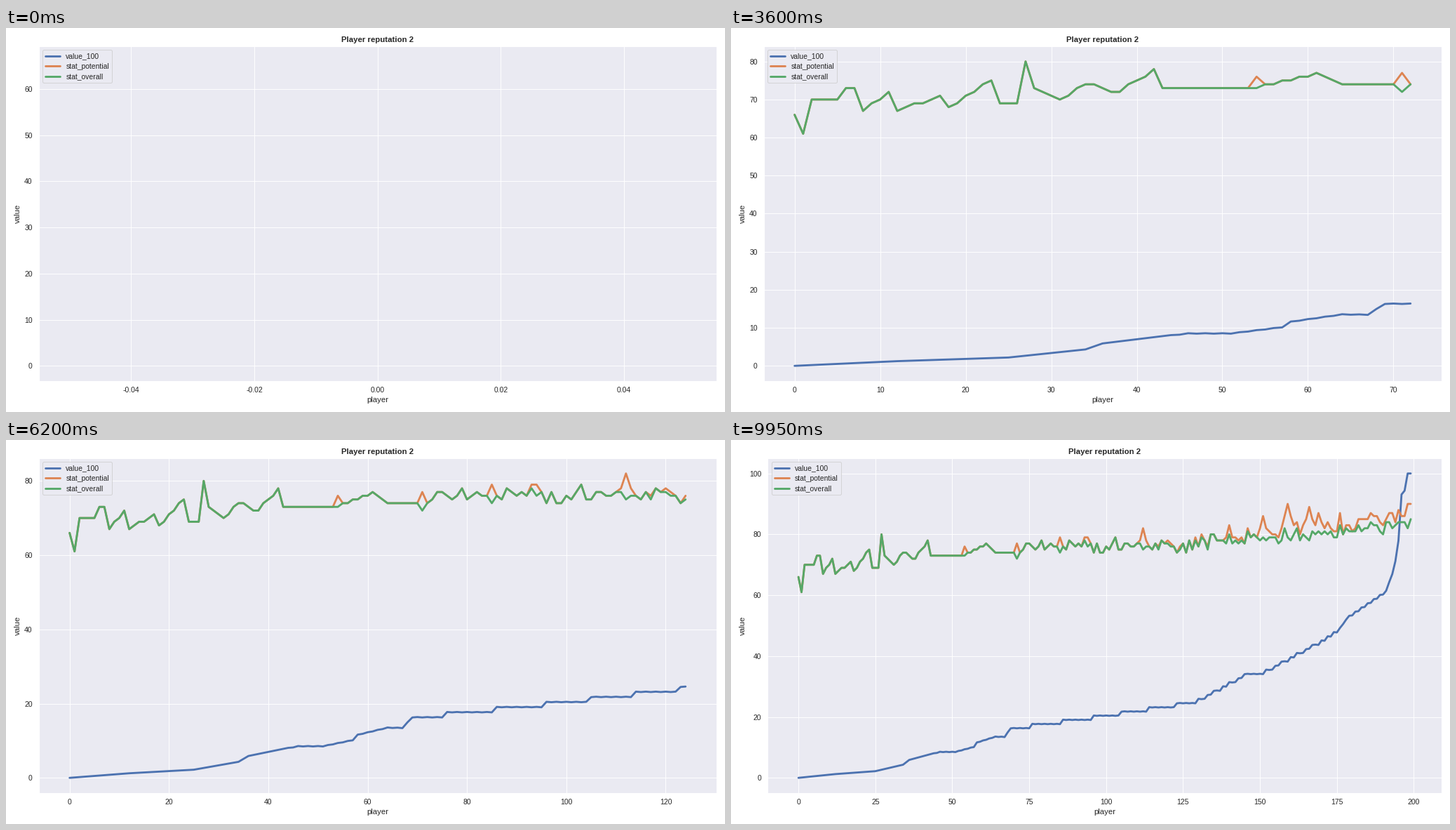
A matplotlib script for the animation above (10 s loop, 1025x547 px).

```python
import numpy as np
import matplotlib.pyplot as plt
from matplotlib.animation import FuncAnimation

W, H, DPI = 1025, 547, 72 * 1025 / 1080
COUNT = 200
INK = "0.15"
TOP_PRICE = 73

plt.rcParams.update({
    "font.family": "Liberation Sans", "font.size": 12,
    "axes.titlesize": 12, "axes.labelsize": 12,
    "xtick.labelsize": 11, "ytick.labelsize": 11, "legend.fontsize": 11,
    "text.color": INK, "axes.labelcolor": INK,
    "xtick.color": INK, "ytick.color": INK,
    "axes.facecolor": "#EAEAF2", "axes.edgecolor": "white",
    "axes.linewidth": 1.25, "axes.grid": True, "axes.axisbelow": True,
    "axes.unicode_minus": False,
    "grid.color": "white", "grid.linewidth": 1, "grid.linestyle": "-",
    "xtick.bottom": False, "ytick.left": False,
    "xtick.major.size": 6, "ytick.major.size": 6, "xtick.major.pad": 2.4,
    "lines.solid_capstyle": "round", "patch.linewidth": 1,
})

players = np.arange(COUNT)
rng = np.random.default_rng(7)


def through(*points):
    """Straight segments through (player, level) points."""
    return np.interp(players, *zip(*points))


def market_value():
    """Price in percent of the top one; whole millions above 12."""
    price = through(
        (0, 0), (12, 0.9), (25, 1.6), (34, 3.15), (36, 4.3), (41, 5.3),
        (46, 6.3), (51, 6.3), (57, 7.5), (58, 8.55), (64, 9.95), (67, 9.9),
        (69, 12), (76, 13), (105, 16), (123, 18), (130, 19), (145, 25),
        (152, 26), (167, 32), (174, 35), (179, 39), (191, 45), (194, 52),
        (195, 57), (196, 68), (197, 69), (198, TOP_PRICE))
    price = np.where(price >= 12, np.floor(price + 1e-9), price)
    wiggle = np.where(players % 2, -0.17, -0.06) * (price > 6)
    return np.where(price < TOP_PRICE, price / TOP_PRICE * 100 + wiggle, 100)


def overall_rating():
    """Sharp swings among the first players, then a slow noisy rise."""
    base = through(
        (0, 66), (1, 61), (2, 70), (5, 70), (6, 73), (7, 73), (8, 67),
        (11, 72), (12, 67), (17, 71), (18, 68), (23, 75), (24, 69), (26, 69),
        (27, 80), (28, 73), (31, 70), (34, 74), (38, 72), (42, 78), (43, 73),
        (54, 73), (61, 77), (64, 74), (70, 74), (75, 76), (120, 76.5),
        (150, 79), (199, 83))
    noise = np.clip(rng.normal(0, 1.5, COUNT), -2.5, 2.5)
    return np.round(base + noise * (players > 70))


def potential_rating(overall):
    """A growing margin over the overall rating, with a few sharp peaks."""
    margin = through((70, 0), (140, 1), (150, 1.5), (160, 4))
    rating = overall + np.round(rng.random(COUNT) * margin)
    peaks = [(54, 76), (71, 77), (85, 79), (93.5, 81), (112, 82), (140, 83),
             (151, 86), (159, 90), (166, 89), (169, 87), (192.5, 89),
             (198.5, 92)]
    for x, top in peaks:
        rating = np.maximum(rating, top - 4 * abs(players - x))
    return rating


overall = overall_rating()
series = [
    ("value_100", "#4C72B0", market_value()),
    ("stat_potential", "#DD8452", potential_rating(overall)),
    ("stat_overall", "#55A868", overall),
]

fig, ax = plt.subplots(figsize=(W / DPI, H / DPI), dpi=DPI, facecolor="white")
ax.set_title("Player reputation 2", fontweight="bold")
ax.set_xlabel("player")
ax.set_ylabel("value")
lines = [ax.plot([], [], color=color, lw=3, label=name)[0]
         for name, color, _ in series]
ax.legend(loc="upper left", labelspacing=0.42)


def draw(k):
    for line, (_, _, data) in zip(lines, series):
        line.set_data(players[:k + 1], data[:k + 1])
    ax.relim()
    ax.autoscale_view()
    # start from a fixed layout so every loop fits the same way
    fig.subplots_adjust(left=0.05, right=0.985, bottom=0.08, top=0.95)
    fig.tight_layout()
    return lines


anim = FuncAnimation(fig, draw, frames=COUNT, init_func=lambda: draw(0),
                     interval=50, repeat=True, repeat_delay=0, blit=False)
plt.show()
```
